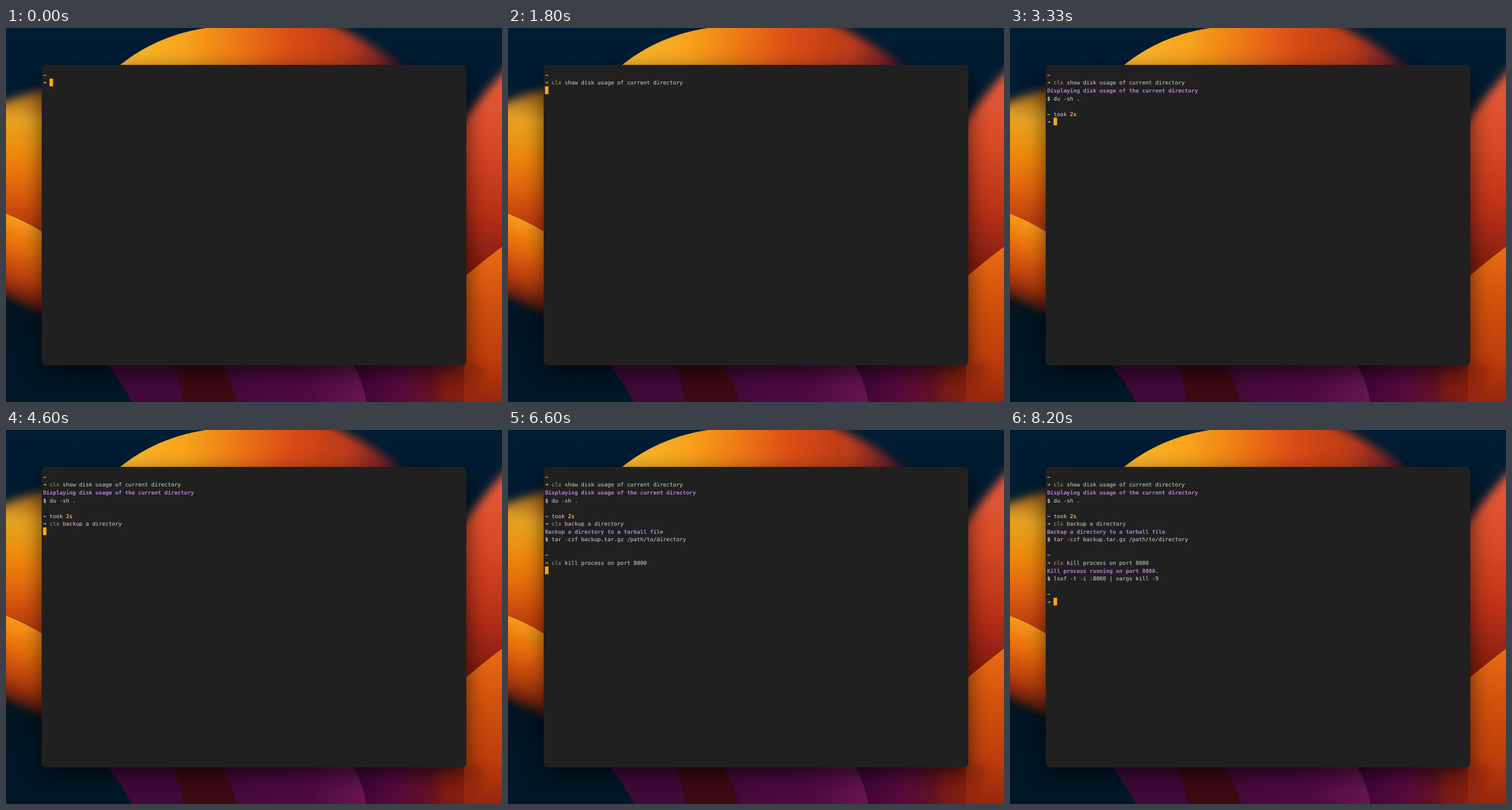
Recreate the animation shown at these times as an HTML page. Size 862 by 649 pixels, loop 8270 ms.

```html
<!DOCTYPE html>
<html lang="en">
<head>
<meta charset="utf-8">
<title>Terminal session</title>
<style>
  html, body { margin: 0; width: 100%; height: 100%; overflow: hidden; background: #01192c; }
  svg { display: block; width: 862px; height: 649px; }
  text {
    font: 9.47px "DejaVu Sans Mono", "Noto Sans Mono", monospace;
    text-rendering: geometricPrecision;
    white-space: pre;
    fill: #d4d6d4;
  }
  .bold, .info, .time, .typed, .prompt { font-weight: bold; }
  .info { fill: #b083d6; }
  .time { fill: #edb04a; }
  .prompt { fill: #c9d2a0; }
  .typed { fill: #cfcb8c; }
  .name { fill: #a9ad70; }
  .hint { fill: #61656a; }
  .under { fill: #94600f; }
  .cursor { fill: #f8a912; }
</style>
</head>
<body>
<svg viewBox="0 0 862 649" xmlns="http://www.w3.org/2000/svg">
  <defs>
    <linearGradient id="sky" x1="0" y1="0" x2="0" y2="1">
      <stop offset="0" stop-color="#011d33"/>
      <stop offset=".25" stop-color="#011a30"/>
      <stop offset=".75" stop-color="#011523"/>
      <stop offset="1" stop-color="#011829"/>
    </linearGradient>
    <linearGradient id="dome" gradientUnits="userSpaceOnUse" x1="215" y1="20" x2="690" y2="70">
      <stop offset="0" stop-color="#f9b52b"/>
      <stop offset=".2" stop-color="#f7a31c"/>
      <stop offset=".4" stop-color="#ec7612"/>
      <stop offset=".58" stop-color="#d94c17"/>
      <stop offset=".8" stop-color="#b83a1a"/>
      <stop offset="1" stop-color="#4a1430"/>
    </linearGradient>
    <linearGradient id="leftTop" gradientUnits="userSpaceOnUse" x1="30" y1="110" x2="10" y2="350">
      <stop offset="0" stop-color="#9c5c1c"/>
      <stop offset=".2" stop-color="#e5a423"/>
      <stop offset=".45" stop-color="#ec8a0c"/>
      <stop offset=".68" stop-color="#e2660a"/>
      <stop offset="1" stop-color="#b53407"/>
    </linearGradient>
    <linearGradient id="leftLow" gradientUnits="userSpaceOnUse" x1="45" y1="335" x2="-10" y2="482">
      <stop offset="0" stop-color="#f8a01c"/>
      <stop offset=".35" stop-color="#e66808"/>
      <stop offset=".65" stop-color="#b53d08"/>
      <stop offset=".86" stop-color="#5c1d0c"/>
      <stop offset="1" stop-color="#26121a"/>
    </linearGradient>
    <linearGradient id="rightTop" gradientUnits="userSpaceOnUse" x1="850" y1="90" x2="815" y2="425">
      <stop offset="0" stop-color="#e2583a"/>
      <stop offset=".3" stop-color="#d84c28"/>
      <stop offset=".65" stop-color="#bd3218"/>
      <stop offset="1" stop-color="#7e1a0e"/>
    </linearGradient>
    <linearGradient id="rightLow" gradientUnits="userSpaceOnUse" x1="825" y1="395" x2="862" y2="649">
      <stop offset="0" stop-color="#e76914"/>
      <stop offset=".3" stop-color="#d2520d"/>
      <stop offset=".7" stop-color="#bd3d0c"/>
      <stop offset="1" stop-color="#96260e"/>
    </linearGradient>
    <linearGradient id="floor" gradientUnits="userSpaceOnUse" x1="600" y1="0" x2="862" y2="0">
      <stop offset="0" stop-color="#390631"/>
      <stop offset=".3" stop-color="#56093f"/>
      <stop offset=".55" stop-color="#641223"/>
      <stop offset=".8" stop-color="#842010"/>
      <stop offset="1" stop-color="#9c290e"/>
    </linearGradient>
    <linearGradient id="plum" gradientUnits="userSpaceOnUse" x1="380" y1="0" x2="625" y2="0">
      <stop offset="0" stop-color="#45093b"/>
      <stop offset=".6" stop-color="#4f0a42"/>
      <stop offset="1" stop-color="#68164f"/>
    </linearGradient>
    <filter id="soft" x="-30%" y="-30%" width="160%" height="160%"><feGaussianBlur stdDeviation="8"/></filter>
    <filter id="shade" x="-20%" y="-20%" width="140%" height="140%"><feGaussianBlur stdDeviation="18"/></filter>
    <clipPath id="domeEdge"><path d="M196 66C242 28 300 4 365 -2L862 -2V80H190Z"/></clipPath>
    <clipPath id="leftEdge"><path d="M0 323Q34 336 64 355L90 370V540H0Z"/></clipPath>
  </defs>

  <rect width="862" height="649" fill="url(#sky)"/>
  <g clip-path="url(#domeEdge)">
    <path d="M120 -60H440C560 -10 632 18 692 72V110H120Z" fill="url(#dome)" filter="url(#soft)"/>
  </g>
  <path d="M-60 152C-20 136 20 114 100 100V380H-60Z" fill="url(#leftTop)" filter="url(#soft)"/>
  <g clip-path="url(#leftEdge)">
    <rect y="300" width="100" height="240" fill="#011523"/>
    <path d="M-60 280H130V526L62 493L0 466L-60 445Z" fill="url(#leftLow)" filter="url(#soft)"/>
  </g>
  <path d="M0 323Q34 336 64 355" fill="none" stroke="#f9b342" stroke-width="1.2" opacity=".7"/>

  <path d="M920 20C880 56 830 110 780 182V480H920Z" fill="url(#rightTop)" filter="url(#soft)"/>
  <path d="M174 583Q199 610 219 649H320V583Z" fill="#400a39"/>
  <path d="M289 583Q303 613 308 649H420V583Z" fill="#3d0a14"/>
  <path d="M374 583Q391 613 402 649H640V583Z" fill="url(#plum)"/>
  <path d="M602 583Q621 614 626 649H862V583Z" fill="url(#floor)"/>
  <path d="M862 380Q830 404 796 433V649H862Z" fill="url(#rightLow)"/>
  <path d="M750 583H835L815 649H750Z" fill="#8a2110" opacity=".55" filter="url(#soft)"/>
  <path d="M862 380Q830 404 796 433" fill="none" stroke="#f08a2c" opacity=".6"/>

  <rect x="62" y="76" width="738" height="521" rx="8" fill="#000" opacity=".62" filter="url(#shade)"/>
  <rect x="62" y="64" width="738" height="521.5" rx="7" fill="#202020"/>
  <g id="screen"></g>
</svg>

<script>
const LOOP = 8270, KEY = 150, LEFT = 64.4, CELL = 5.7, LINE = 13.55;
const screen = document.getElementById("screen");

// Times: first key, suggestion accepted, return pressed, answer printed.
const session = [
  { row: 0, times: [400, 1450, 1670, 3000], ask: "show disk usage of current directory",
    info: "Displaying disk usage of the current directory", run: "du -sh ." },
  { row: 5, took: "2s", times: [3500, 4130, 4330, 5270], ask: "backup a directory",
    info: "Backup a directory to a tarball file", run: "tar -czf backup.tar.gz /path/to/directory" },
  { row: 10, times: [5530, 6130, 6330, 7470], ask: "kill process on port 8000",
    info: "Kill process running on port 8000.", run: "lsof -t -i :8000 | xargs kill -9" }
];

const put = (row, col, str, kind = "") =>
  `<text class="${kind}" x="${LEFT + col * CELL}" y="${84.9 + row * LINE}">${str}</text>`;

const cursor = (row, col) =>
  `<rect class="cursor" x="${LEFT + col * CELL - 0.2}" y="${74.2 + row * LINE}" width="6.2" height="13.5"/>`;

const prompt = (row, took) =>
  put(row, 0, "~", "bold") +
  (took ? put(row, 2, "took") + put(row, 7, took, "time") : "") +
  put(row + 1, 0, "➜", "prompt");

function typing(row, line, count) {
  const shown = line.slice(0, count);
  let out = put(row, 2, shown.slice(0, 3), "typed") + put(row, 6, shown.slice(4));
  out += cursor(row, 2 + count);
  if (count && count < line.length) {
    out += put(row, 2 + count, line[count], "under");
    out += put(row, 3 + count, line.slice(count + 1), "hint");
  }
  return out;
}

function draw(t) {
  let out = "";
  for (const { row, took, times, ask, info, run } of session) {
    const [start, accept, enter, done] = times;
    const line = "clx " + ask;
    out += prompt(row, took);
    if (t < enter) {
      const keys = Math.max(0, Math.min(4, Math.floor((t - start) / KEY) + 1));
      return out + typing(row + 1, line, t < accept ? keys : line.length);
    }
    out += put(row + 1, 2, "clx", "name") + put(row + 1, 6, ask);
    if (t < done) return out + cursor(row + 2, 0);
    out += put(row + 2, 0, info, "info") + put(row + 3, 0, "$", "prompt") + put(row + 3, 2, run);
  }
  return out + prompt(15) + cursor(16, 2);
}

let last = "";
function tick() {
  const next = draw(performance.now() % LOOP);
  if (next !== last) screen.innerHTML = last = next;
  requestAnimationFrame(tick);
}
tick();
</script>
</body>
</html>
```
